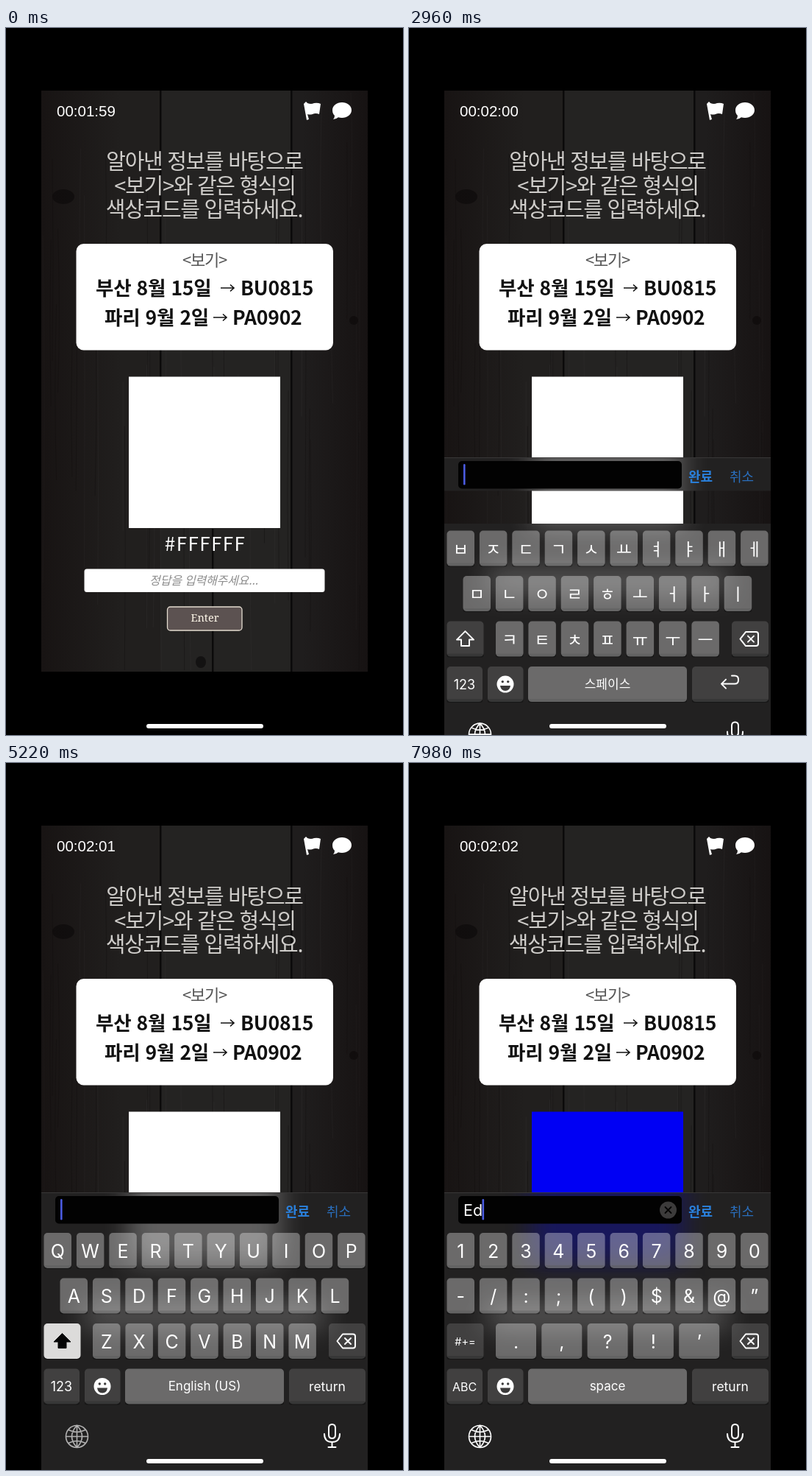
Write an HTML page that moves like this. It is 540 px wide and 960 px high and loops after 8000 ms.

```html
<!DOCTYPE html>
<html lang="ko">
<head>
<meta charset="utf-8">
<style>
html, body { margin: 0; width: 100%; height: 100%; overflow: hidden; background: #000; }
svg { display: block; width: 100%; height: 100%; }
text { white-space: pre; }
.kr { font-family: "Noto Sans CJK KR", "Noto Sans CJK", sans-serif; }
.ui { font-family: Inter, Roboto, sans-serif; }
.arial { font-family: "Liberation Sans", Arial, sans-serif; }
.serif { font-family: "Noto Serif", serif; }
.line { fill: none; stroke: #fff; stroke-width: 2; stroke-linecap: round; stroke-linejoin: round; }
</style>
</head>
<body>
<svg id="stage" viewBox="0 0 540 960"></svg>
<script>
const LOOP = 8000;
const WHITE = '#fff', PANEL = '#222121';
const LIGHT_KEY = 'rgba(255,255,255,.33)', DARK_KEY = 'rgba(255,255,255,.14)';
const ROWS = [638, 699.5, 761, 822.5], KEY_H = 48, PITCH = 44.4;
const BAR_Y = 583, PANEL_Y = 628.5;

// Moments in ms when the user's actions take effect.
const OPEN = 2360, ENGLISH = 4480, GLOBE_UP = 5400, TYPE_E = 6450, TYPE_D = 7280, DIGITS = 7840;
const SECOND = 2700, FIRST_TICK = 2080;

const rect = (x, y, w, h, r, fill, extra = '') =>
  `<rect x="${x}" y="${y}" width="${w}" height="${h}" rx="${r}" fill="${fill}" ${extra}/>`;
const text = (cls, x, y, size, str, fill = WHITE, extra = '') =>
  `<text class="${cls}" x="${x}" y="${y}" font-size="${size}" fill="${fill}" ${extra}>${
    str.replace(/&/g, '&amp;').replace(/</g, '&lt;')}</text>`;
const mid = (cls, x, y, size, str, fill, extra = '') =>
  text(cls, x, y, size, str, fill, 'text-anchor="middle" ' + extra);
const line = (d, extra = '') => `<path class="line" d="${d}" ${extra}/>`;

function rng(seed) {
  return () => (seed = (seed * 16807) % 2147483647) / 2147483647;
}

function wood() {
  const rand = rng(41);
  let s = rect(48, 85, 162, 789, 0, '#211f1e') + rect(210, 85, 178, 789, 0, '#242322') +
    rect(388, 85, 104, 789, 0, '#1f1d1d');
  for (let i = 0; i < 46; i++) {
    const x = 50 + rand() * 440, y = 85 + rand() * 500, bend = rand() * 8 - 4;
    const len = Math.min(150 + rand() * 400, 872 - y);
    s += `<path d="M${x} ${y}q${bend} ${len / 2} 0 ${len}" fill="none" stroke="${
      rand() < .6 ? '#121110' : '#323030'}" stroke-opacity=".45"/>`;
  }
  for (const [x, y, h] of [[210, 85, 590], [388, 85, 789], [281, 680, 194]])
    s += rect(x - 1, y, 2.5, h, 0, '#0b0a0a');
  for (const [x, y, rx, ry] of [[78, 229, 15, 10], [473, 397, 6, 6], [265, 861, 7, 8]])
    s += `<ellipse cx="${x}" cy="${y}" rx="${rx}" ry="${ry}" fill="#0d0b0b" opacity=".7"/>`;
  return s + rect(48, 85, 444, 789, 0, 'url(#edge)');
}

function page() {
  const title = 'font-weight="300" letter-spacing="-1.3"';
  const bold = 'font-weight="700" letter-spacing="-.2"';
  const ink = '#111';
  const arrow = (x, y) =>
    `<path d="M${x} ${y}h18m-5 -4.5l5 4.5l-5 4.5" fill="none" stroke="${ink}" stroke-width="1.6"/>`;
  return text('arial', 69, 120, 20.5, '', WHITE, 'id="timer"') +
    `<path d="M405 103l3 -3l2 2q5 2 9 0q5 -1 9 1l-2 14q-5 -2 -9 0q-4 1 -7 0l2 7l-3 1z" fill="${WHITE}"/>` +
    `<path d="M457 101c7 0 13 4.500 13 10.500s-6 10.500 -13 10.500q-3 0 -5 -.7q-3 2.700 -7 2.700q2 -2 2 -5q-3 -3 -3 -7.500c0 -6 6 -10.500 13 -10.500z" fill="${WHITE}"/>` +
    mid('kr', 270, 192, 29, '알아낸 정보를 바탕으로', '#cfcdca', title) +
    mid('kr', 270.5, 224.5, 29, '<보기>와 같은 형식의', '#cfcdca', title) +
    mid('kr', 269.5, 256.5, 29, '색상코드를 입력하세요.', '#cfcdca', title) +
    rect(95.5, 293, 349.5, 144.5, 10, WHITE) +
    mid('kr', 270, 323, 22, '<보기>', '#555', 'font-weight="300" letter-spacing="-1.2"') +
    text('kr', 122, 363, 26.5, '부산 8월 15일', ink, bold) + arrow(292, 353) +
    text('kr', 319, 363, 26.5, 'BU0815', ink, bold) +
    text('kr', 134, 402.5, 26.5, '파리 9월 2일', ink, bold) + arrow(282, 393) +
    text('kr', 308, 402.5, 26.5, 'PA0902', ink, bold) +
    rect(167, 473.5, 206, 205.5, 0, WHITE, 'id="swatch"') +
    mid('kr', 271, 710, 26, '#FFFFFF', WHITE, 'letter-spacing="1.4"') +
    rect(106.5, 734.5, 327, 31.5, 3.5, WHITE) +
    mid('kr', 269, 756, 16, '정답을 입력해주세요...', '#8c8c8c', 'font-style="italic" font-weight="300" letter-spacing="-.2"') +
    rect(219.5, 786, 101.5, 32, 4, '#5c5251', 'stroke="#e4dcd0" stroke-width="1.3"') +
    mid('serif', 270.5, 806, 14.5, 'Enter', '#fff8ea');
}

function inputBar() {
  return rect(48, BAR_Y, 444, 1, 0, '#383737') + rect(67, 588, 304, 37.5, 5, '#020202') +
    text('ui', 74, 615, 21.5, '', WHITE, 'id="typed"') +
    rect(74, 592, 2.6, 28.5, 1.3, '#4a5be0', 'id="caret"') +
    '<g id="clear"><circle cx="352.5" cy="607" r="11.5" fill="#3c3b3b"/>' +
    '<path d="M348.5 603l8 8m0 -8l-8 8" stroke="#050505" stroke-width="1.8" stroke-linecap="round"/></g>' +
    text('kr', 380, 615.5, 18, '완료', '#2a80dc', 'font-weight="700"') +
    text('kr', 436, 615.5, 18, '취소', '#2a6fbe');
}

// Blurred page seen through the input bar and the keyboard panel.
function backdrop() {
  return '<g id="backdrop" clip-path="url(#covered)">' +
    rect(48, BAR_Y, 444, 377, 0, PANEL) + '<g filter="url(#blur)" opacity=".28">' +
    rect(167, 473.5, 206, 205.5, 0, WHITE, 'id="ghost"') +
    rect(106.5, 734.5, 327, 31.5, 0, WHITE) + '</g></g>';
}

const key = (x, y, w, fill = LIGHT_KEY) =>
  rect(x, y + KEY_H - 4, w, 5, 3, 'rgba(0,0,0,.35)') + rect(x, y, w, KEY_H, 5, fill);

function keyRow(chars, x, y, style, w = 37.5, pitch = PITCH) {
  return [...chars].map((c, i) => key(x + i * pitch, y, w) +
    mid(style.cls, x + i * pitch + w / 2, y + style.dy, style.size, c, WHITE, `font-weight="${style.weight}"`)).join('');
}

const KOREAN = { cls: 'kr', size: 23, dy: 33, weight: 400 };
const CAPS = { cls: 'ui', size: 25, dy: 33.5, weight: 400 };
const SMALL = { cls: 'ui', size: 27, dy: 31, weight: 300 };

function letters(rows, style) {
  return keyRow(rows[0], 51.5, ROWS[0], style) + keyRow(rows[1], 73.5, ROWS[1], style) +
    keyRow(rows[2], 118, ROWS[2], style);
}

function shift(on) {
  const d = 'M76.5 774.5l11.5 11.5h-6v8.5h-11v-8.5h-6z';
  return key(51.5, ROWS[2], 50, on ? '#dcdbda' : DARK_KEY) +
    (on ? `<path d="${d}" fill="#050505" stroke="#050505" stroke-linejoin="round"/>` : line(d));
}

const corner = label => key(51.5, ROWS[3], 48.5, DARK_KEY) +
  mid('ui', 75.5, 853, label === 'ABC' ? 16 : 18, label);
const enterKey = label => key(385, ROWS[3], 104, DARK_KEY) + (label
  ? mid('ui', 437, 853, 17.5, label)
  : line('M431 840l-6 6l6 6m-6 -6h18q5 0 5 -5v-1q0 -5 -5 -5h-4'));

const LAYOUTS = {
  korean: letters(['ㅂㅈㄷㄱㅅㅛㅕㅑㅐㅔ', 'ㅁㄴㅇㄹㅎㅗㅓㅏㅣ', 'ㅋㅌㅊㅍㅠㅜㅡ'], KOREAN) +
    shift(false) + corner('123') + enterKey(''),
  upper: letters(['QWERTYUIOP', 'ASDFGHJKL', 'ZXCVBNM'], CAPS) +
    shift(true) + corner('123') + enterKey('return'),
  lower: letters(['qwertyuiop', 'asdfghjkl', 'zxcvbnm'], SMALL) +
    shift(false) + corner('123') + enterKey('return'),
  digits: keyRow('1234567890', 51.5, ROWS[0], CAPS) + keyRow('-/:;()$&@”', 51.5, ROWS[1], CAPS) +
    keyRow('.,?!’', 118, ROWS[2], CAPS, 55, 62.3) + key(51.5, ROWS[2], 50, DARK_KEY) +
    mid('ui', 76.5, 790.5, 14.5, '#+=') + corner('ABC') + enterKey('return')
};

function keyboard() {
  const groups = Object.entries(LAYOUTS).map(([name, body]) => `<g id="${name}">${body}</g>`).join('');
  return groups + key(439, ROWS[2], 50, DARK_KEY) +
    line('M458 775.5h14q3 0 3 3v13q0 3 -3 3h-14l-7.5 -9.5zm3 5.5l8 8m0 -8l-8 8') +
    key(107, ROWS[3], 48.5, DARK_KEY) +
    `<circle cx="131" cy="846.5" r="11.5" fill="${WHITE}"/>` +
    '<path d="M124 848.5h14q-1 7 -7 7t-7 -7z" fill="#3c3b3b"/>' +
    '<circle cx="127.3" cy="843" r="1.7" fill="#3c3b3b"/><circle cx="134.7" cy="843" r="1.7" fill="#3c3b3b"/>' +
    key(162, ROWS[3], 216) + mid('ui', 270, 852, 17, '', WHITE, 'id="space"') +
    '<g id="globe">' + line('M81.5 914.5a15 15 0 1 0 30 0a15 15 0 1 0 -30 0h30M96.5 899.5v30' +
      'M96.5 899.5q-14 15 0 30q14 -15 0 -30M85 905.5q11.5 6 23 0M85 923.5q11.5 -6 23 0', 'style="stroke-width:1.6"') + '</g>' +
    line('M443.5 898q4.5 0 4.5 5v9q0 5 -4.5 5t-4.5 -5v-9q0 -5 4.5 -5z' +
      'M433 911q0 11 10.5 11t10.5 -11M443.5 922v7m-5 0h10');
}

const stage = document.getElementById('stage');
stage.innerHTML = `<defs>
  <linearGradient id="edge"><stop offset="0" stop-color="#0e0808" stop-opacity=".5"/>
    <stop offset=".25" stop-color="#0e0808" stop-opacity="0"/><stop offset=".8" stop-color="#0e0808" stop-opacity="0"/>
    <stop offset="1" stop-color="#0e0808" stop-opacity=".5"/></linearGradient>
  <filter id="blur" filterUnits="userSpaceOnUse" x="0" y="400" width="540" height="480"><feGaussianBlur stdDeviation="18"/></filter>
  <clipPath id="covered">${rect(48, BAR_Y, 444, PANEL_Y - BAR_Y, 0, WHITE)}${rect(48, PANEL_Y, 444, 340, 0, WHITE, 'id="panel"')}</clipPath>
</defs>` + rect(0, 0, 540, 960, 0, '#000') + wood() + page() + '<g id="overlay">' + backdrop() +
  `<g id="board">${keyboard()}</g>${inputBar()}</g>` + rect(191, 945, 159, 6, 3, WHITE);

const el = {};
stage.querySelectorAll('[id]').forEach(n => el[n.id] = n);
const show = (node, on) => node.setAttribute('display', on ? 'inline' : 'none');
const pick = (t, steps) => steps.filter(([from]) => t >= from).pop()[1];

// Critically damped slide of the keyboard panel.
function slide(t) {
  const u = Math.max(0, t - OPEN) / 171;
  return 332 * (1 + u) * Math.exp(-u);
}

function clock(t) {
  const s = 120 + Math.floor((t - FIRST_TICK) / SECOND);
  return `00:0${Math.floor(s / 60)}:${String(s % 60).padStart(2, '0')}`;
}

function render(t) {
  const layout = pick(t, [[0, 'korean'], [ENGLISH, 'upper'], [TYPE_E, 'lower'], [DIGITS, 'digits']]);
  const typed = pick(t, [[0, ''], [TYPE_E, 'E'], [TYPE_D, 'Ed']]);
  const color = [WHITE, '#050508', '#0000f4'][typed.length];
  const offset = slide(t);

  el.timer.textContent = clock(t);
  show(el.overlay, t >= OPEN);
  el.board.setAttribute('transform', `translate(0 ${offset.toFixed(2)})`);
  el.panel.setAttribute('y', PANEL_Y + offset);
  for (const name in LAYOUTS) show(el[name], name === layout);

  el.typed.textContent = typed;
  el.caret.setAttribute('x', [74, 86.5, 99.5][typed.length]);
  show(el.clear, typed);
  el.swatch.setAttribute('fill', color);
  el.ghost.setAttribute('fill', color);

  el.space.textContent = pick(t, [[0, '스페이스'], [ENGLISH, 'English (US)'], [DIGITS, 'space']]);
  el.space.setAttribute('class', layout === 'korean' ? 'kr' : 'ui');
  el.globe.setAttribute('opacity', t >= ENGLISH && t < GLOBE_UP ? .65 : 1);
}

const start = performance.now();
function tick() {
  render((performance.now() - start) % LOOP);
  requestAnimationFrame(tick);
}
tick();
</script>
</body>
</html>
```
